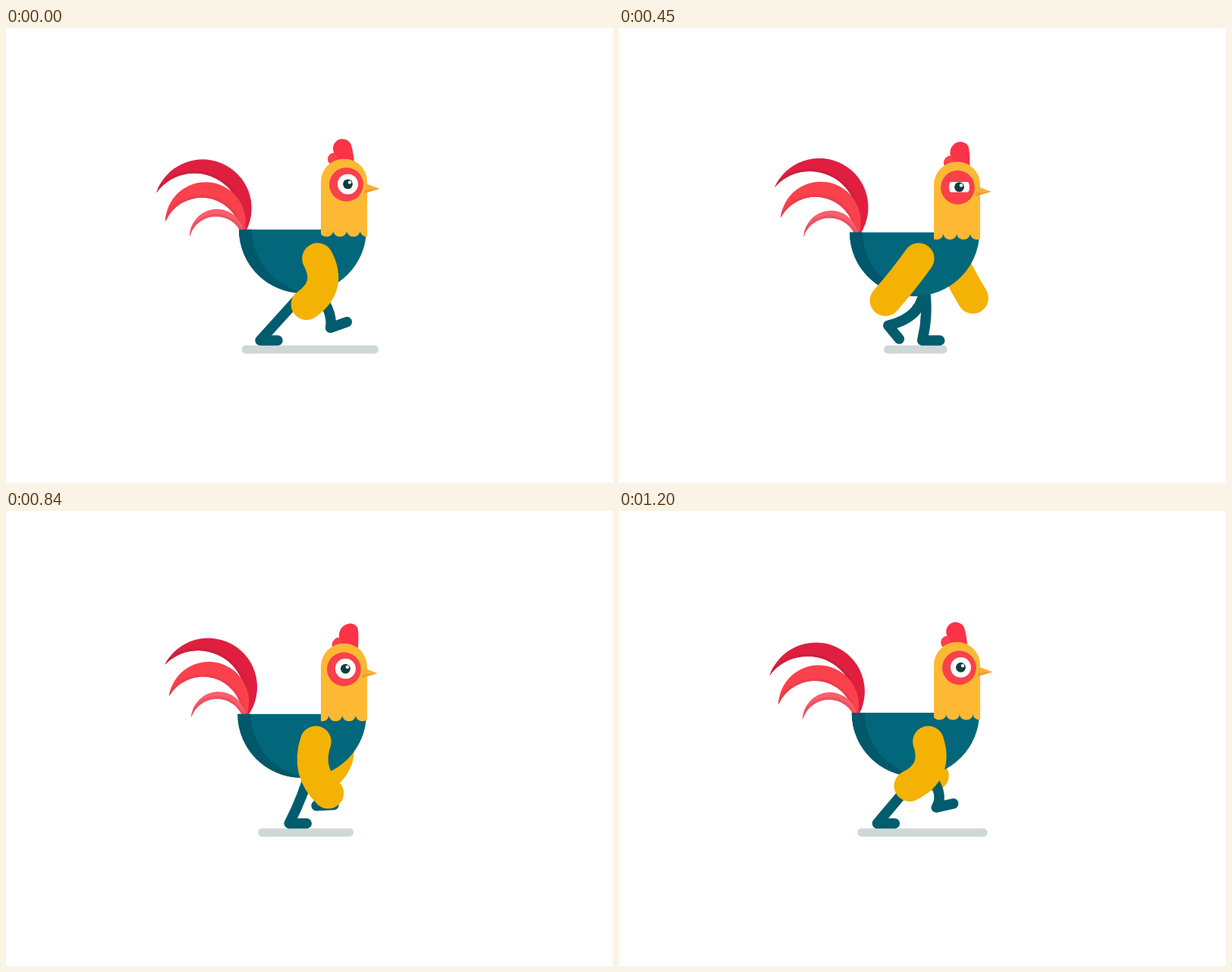
Write an HTML page with a canvas that moves like this. It is 800 by 600 pixels and loops after 1230 ms.

```html
<!DOCTYPE html>
<html>
<head>
<meta charset="utf-8">
<title>Walking rooster</title>
<style>
html, body { margin: 0; width: 100%; height: 100%; overflow: hidden; background: #fff; }
canvas { display: block; }
</style>
</head>
<body>
<canvas id="stage" width="800" height="600"></canvas>
<script>
const ctx = document.getElementById('stage').getContext('2d');
const LOOP = 1230, CYCLE = LOOP / 2, TAU = Math.PI * 2;
const TEAL = '#02677a', LEG = '#015c6d', GOLD = '#f4b205', HEAD = '#fdb933', RED = '#f8414b';

const FEATHERS = [
  { outer: 'M198 217A64.5 64.5 0 1 1 317 266', inner: 'L309 266A62 62 0 0 0 198 217', color: '#e01f40', shade: '#cb203d', swing: .18 },
  { outer: 'M210 255A53 53 0 1 1 315 266', inner: 'L309 266A52 52 0 0 0 210 255', color: '#fb414b', shade: '#ea3f4b', swing: .156 },
  { outer: 'M242 275A36 36 0 0 1 313 266', inner: 'L308 266A36 36 0 0 0 242 275', color: '#fa5f6c', shade: '#ea5362', swing: .09 }
];

// Swing of the walk cycle, peaking at the given time
const wave = (time, peak, size = 1) => size * Math.cos(TAU * (time - peak) / CYCLE);

function fill(path, color) {
  ctx.fillStyle = color;
  ctx.fill(new Path2D(path));
}

function disc(x, y, rx, color, ry = rx) {
  ctx.fillStyle = color;
  ctx.beginPath();
  ctx.ellipse(x, y, rx, ry, 0, 0, TAU);
  ctx.fill();
}

function line(path, width, color) {
  ctx.lineWidth = width;
  ctx.strokeStyle = color;
  ctx.stroke(new Path2D(path));
}

function layer(draw) {
  ctx.save();
  draw();
  ctx.restore();
}

function shadow(time) {
  const width = 131 + 49 * Math.cos(2 * TAU * time / CYCLE);
  const center = 382 + .105 * width;
  ctx.fillStyle = '#cfd8d7';
  ctx.beginPath();
  ctx.roundRect(center - width / 2, 418.5, width, 11, 5);
  ctx.fill();
}

function wing(x, y, tipX, tipY, bend) {
  const dx = tipX - x, dy = tipY - y, k = 2 * bend / Math.hypot(dx, dy);
  line(`M${x} ${y}Q${(x + tipX) / 2 + dy * k} ${(y + tipY) / 2 - dx * k} ${tipX} ${tipY}`, 41, GOLD);
}

function leg(time) {
  const hipX = 402, hipY = 338, foot = 23;
  const swing = Math.min(1, (time + CYCLE - 350) % CYCLE / 345);
  const lift = Math.sin(Math.PI * swing);
  const fold = 2 * lift * (1 - swing);
  const reach = wave(time, 50);
  const x = 384 + 50 * reach, y = 412 - 25 * lift;
  const angle = .6 * Math.sin(TAU * swing) + .38 * lift;
  const toeX = x + foot * Math.cos(angle);
  const toeY = Math.min(412, y + foot * Math.sin(angle));
  const kneeX = (hipX + x) / 2 + 6 + 6 * reach + 20 * fold;
  const kneeY = (hipY + y) / 2 + 14 * fold;
  line(`M${hipX} ${hipY}Q${kneeX} ${kneeY} ${x} ${y}L${toeX} ${toeY}`, 13.5, LEG);
}

function tail(sway) {
  for (const { outer, inner, color, shade, swing } of FEATHERS) layer(() => {
    ctx.translate(314, 266);
    ctx.rotate(sway * swing);
    ctx.translate(-314, -266);
    fill(outer + inner, color);
    ctx.clip(new Path2D(outer + inner));
    line(inner.replace('L', 'M'), 7, shade);
  });
}

function body(stretch) {
  ctx.translate(475, 265.3);
  ctx.scale(stretch, 1);
  ctx.translate(-84, 0);
  fill('M-84 0A84 84 0 0 0 84 0Z', TEAL);
  fill('M-84 0A84 84 0 0 0 8.5 83.5A84 84 0 0 1 -67 0Z', '#01586a');
}

// turn runs from 0 (facing right) to 1 (slightly towards the viewer)
function head(turn, eyeOpen) {
  layer(() => {
    ctx.translate(0, 205);
    ctx.transform(1, 0, -.21 * turn, 1, 0, 0);
    ctx.translate(0, -205);
    disc(432.5, 172.5, 8.5, RED);
    fill('M431 158.5A12.4 12.4 0 0 1 455.6 156Q458 164 459.5 182H436V168Q431 165 431 158.5Z', '#fb3348');
  });

  layer(() => {
    ctx.beginPath();
    ctx.roundRect(415, 172, 61, 110, [30.5, 30.5, 0, 0]);
    ctx.clip();
    ctx.fillStyle = HEAD;
    ctx.fillRect(415, 172, 61, 95.5);
    for (let i = 0; i < 5; i++) disc(422.5 - 7 * turn + 17.7 * i, 267, 8.85, HEAD, 7.8);
  });

  layer(() => {
    ctx.translate(-3.7 * turn, 0);
    fill('M474 204.5L492.5 211.5L472 217.5Z', '#fbb034');
    fill('M473 213L492.5 211.5L472 217.5Z', '#ee9c2c');
    disc(448.5, 206, 22.4, RED);
    ctx.beginPath();
    ctx.rect(430, 205.5 - 13.5 * eyeOpen, 40, 27 * eyeOpen);
    ctx.clip();
    disc(450.5, 205.5, 13.5, '#fff');
    disc(450.5, 205.5, 6.4, '#123c40');
    disc(453, 203.2, 2.2, '#fff');
  });
}

function draw(time) {
  const sway = (1 - wave(time, 0)) / 2;
  const dip = (1 - wave(2 * time, 0)) / 2;
  const bend = wave(time, 597, 14);
  const eyeOpen = Math.min(1, Math.abs(time - 495) / 90);

  ctx.fillStyle = '#fff';
  ctx.fillRect(0, 0, 800, 600);
  ctx.lineCap = ctx.lineJoin = 'round';

  shadow(time);
  wing(434, 295, 428 + wave(time, 400, 44), 351 - wave(time, 90, 6), -bend);
  leg(time);
  leg(time + 337.5);
  layer(() => {
    ctx.translate(0, .4 + 3.9 * dip);
    layer(() => {
      ctx.translate(3 * sway, 0);
      tail(sway);
    });
    layer(() => body(1 + .018 * dip));
    head(sway, eyeOpen);
  });
  wing(405 + wave(time, 100, 11), 304, 394 + wave(time, 149, 43), 366 + wave(time, 175, 7), bend);
}

function tick() {
  draw(Math.floor(performance.now() % LOOP / 30) * 30);
  requestAnimationFrame(tick);
}
tick();
</script>
</body>
</html>
```
